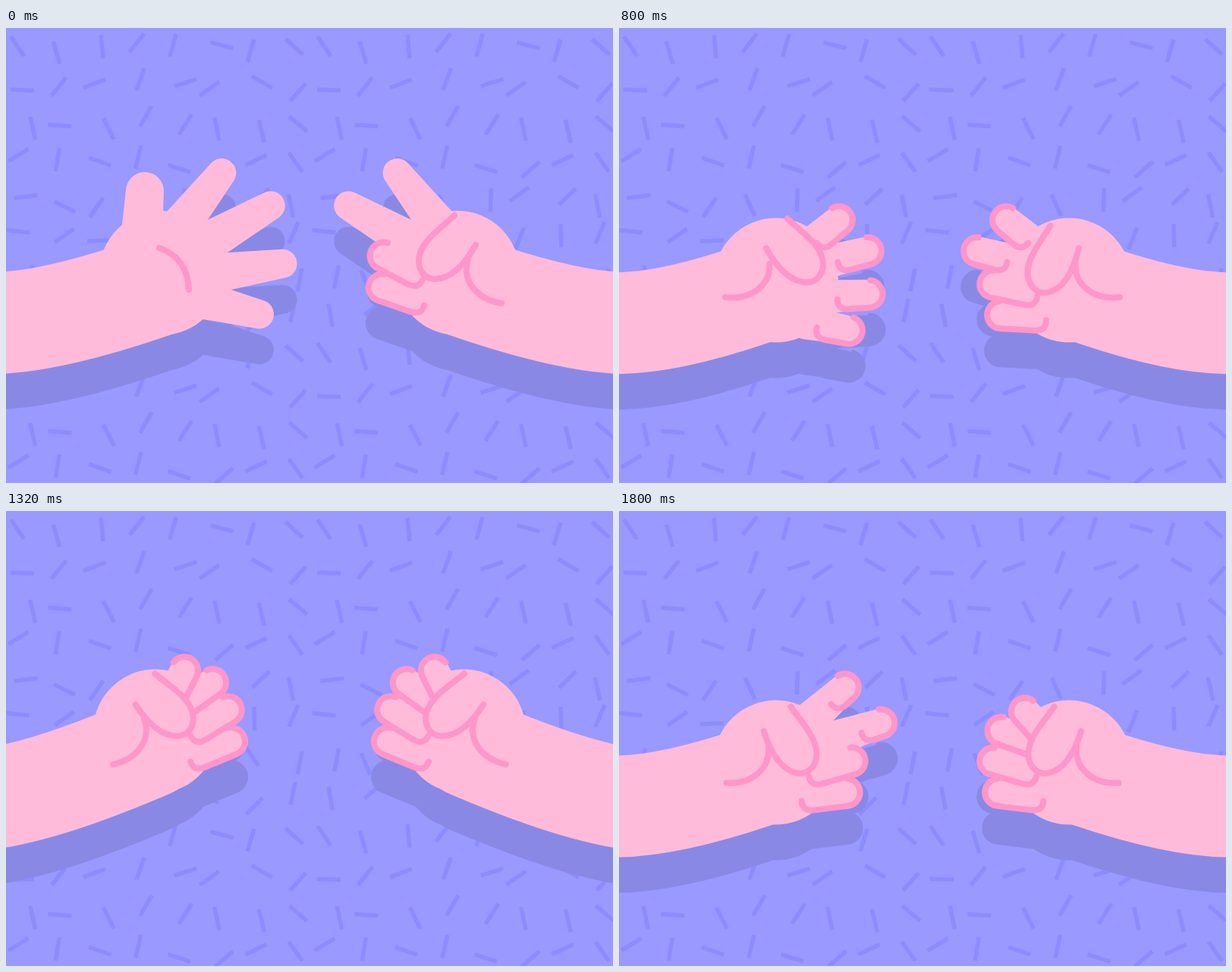
Write an HTML page with a canvas that moves like this. It is 800 px wide and 600 px high and loops after 1840 ms.

```html
<!DOCTYPE html>
<html lang="en">
<head>
<meta charset="utf-8">
<title>Rock, paper, scissors</title>
<style>
html, body { margin: 0; width: 100%; height: 100%; overflow: hidden; background: #9999ff; }
canvas { display: block; }
</style>
</head>
<body>
<canvas id="stage" width="800" height="600"></canvas>
<script>
const ctx = document.getElementById('stage').getContext('2d');
const LOOP = 1840, STEP = 40, DROP = 47, PALM = 82, TIP = 18;
const SKIN = '#ffbbd9', LINE = '#ff96ca', SHADE = '#8989e5';
const rad = deg => deg * Math.PI / 180;
const mix = (a, b, u) => a + (b - a) * u;

// time, wrist bend in degrees, arm lift, openness of the fingers
const keys = [
  [0, 0, 0, 1],
  [600, 0, 0, 1],
  [800, 16, -.03, .4],
  [940, 22, -.1, 0],
  [1080, 25, -.14, 0],
  [1200, 22, 0, 0],
  [1320, -3.5, .6, 0],
  [1560, -28, 1, 0],
  [1700, -15, .65, 0],
  [1800, 12, -.05, .7],
  [1840, 0, 0, 1]
];

// Index to little finger: distance of the tip from the palm, and tilt when folded
const fingers = [
  { shut: 89, wide: 154, tilt: -60 },
  { shut: 99, wide: 169, tilt: -32 },
  { shut: 100, wide: 160, tilt: -28 },
  { shut: 101, wide: 140, tilt: -19 }
];

// Smooth interpolation that never overshoots its keys
function sample(t) {
  const last = keys.length - 1;
  const i = keys.findIndex((key, n) => n === last - 1 || keys[n + 1][0] > t);
  const a = keys[i], b = keys[i + 1], span = b[0] - a[0], u = (t - a[0]) / span;
  const slope = (j, k) => (keys[j + 1][k] - keys[j][k]) / (keys[j + 1][0] - keys[j][0]);
  const tangent = (j, k) => {
    if (j === 0 || j === last) return 0;
    const p = slope(j - 1, k), q = slope(j, k);
    return p * q > 0 ? 2 * p * q / (p + q) : 0;
  };
  return [1, 2, 3].map(k => mix(a[k], b[k], u * u * (3 - 2 * u)) +
    span * u * (1 - u) * (tangent(i, k) * (1 - u) - tangent(i + 1, k) * u));
}

// Seeded dashes on a loose grid that repeats like wallpaper
function drawConfetti() {
  const cell = 50.5, tile = cell * 8, half = 15.5;
  let seed = 11;
  const random = () => (seed = seed * 16807 % 2147483647) / 2147483647;
  ctx.fillStyle = '#9999ff';
  ctx.fillRect(0, 0, 800, 600);
  ctx.strokeStyle = '#8c8cff';
  ctx.lineWidth = 5.5;
  ctx.lineCap = 'butt';
  ctx.beginPath();
  for (let n = 0; n < 64; n++) {
    const x0 = (n % 8 + .5 + (random() - .5) * .4) * cell;
    const y0 = (Math.floor(n / 8) + .5 + (random() - .5) * .4) * cell;
    const tilt = random() * Math.PI;
    const dx = half * Math.cos(tilt), dy = half * Math.sin(tilt);
    for (let x = x0 - tile; x < 820; x += tile)
      for (let y = y0 - tile; y < 620; y += tile) {
        ctx.moveTo(x - dx, y - dy);
        ctx.lineTo(x + dx, y + dy);
      }
  }
  ctx.stroke();
}

// Outline around two circles
function capsule(x, y, r, bx, by, br) {
  const a = Math.atan2(y - by, x - bx);
  const s = Math.acos((br - r) / Math.hypot(x - bx, y - by));
  ctx.beginPath();
  ctx.arc(x, y, r, a - s, a + s);
  ctx.arc(bx, by, br, a + s, a - s + 2 * Math.PI);
  ctx.fill();
}

// The fingers fan out evenly; an opening finger stretches and straightens
function poseFinger(i, open) {
  const { shut, wide, tilt } = fingers[i];
  const fan = rad(mix(-61 + 24 * i, -59 + 27.3 * i, Math.sqrt(open)));
  const reach = mix(shut, wide, open);
  const dir = rad(mix(tilt, -52 + 22 * i, open));
  return { x: reach * Math.cos(fan), y: reach * Math.sin(fan), dir, open };
}

function fillFinger({ x, y, dir, open }) {
  const length = mix(38, 85, open);
  capsule(x, y, TIP + 1, x - length * Math.cos(dir), y - length * Math.sin(dir), mix(20, 25.5, open));
}

// Folded fingertip: round the end, back along the lower side, then a hook
function strokeFold({ x, y, dir, open }) {
  if (open > .85) return;
  const back = -45 * (1 - open);
  ctx.save();
  ctx.translate(x, y);
  ctx.rotate(dir);
  ctx.beginPath();
  ctx.arc(0, 0, TIP, rad(-80), Math.PI / 2);
  ctx.lineTo(back, TIP);
  ctx.quadraticCurveTo(back - 16, TIP, back - 15, TIP - 14);
  ctx.stroke();
  ctx.restore();
}

function drawArm(ex, ey, lift) {
  const sy = 388.5 - 21.5 * lift, cx = ex * .38;
  const cy = ey + (ex - cx) * Math.tan(rad(19 + 7 * lift));
  ctx.lineWidth = 134;
  ctx.lineCap = 'round';
  ctx.beginPath();
  ctx.moveTo(-cx, 2 * sy - cy);
  ctx.lineTo(0, sy);
  ctx.quadraticCurveTo(cx, cy, ex, ey);
  ctx.stroke();
}

// Thumb held out, with the crease of the bare palm
function drawOpenThumb(u) {
  capsule(mix(25, -22, u), mix(-40, -108, u), 25, -26, -53, 27);
  ctx.beginPath();
  ctx.moveTo(-3, -33);
  ctx.quadraticCurveTo(34, -20, 36, 22);
  ctx.stroke();
}

// Thumb laid across the fingers
function drawFoldedThumb(open) {
  ctx.save();
  ctx.translate(-24, -37);
  ctx.rotate(rad(-40 * open));
  ctx.beginPath();
  ctx.moveTo(28, -39);
  ctx.bezierCurveTo(44, -23, 75, -4, 75, 21);
  ctx.bezierCurveTo(75, 35, 66, 45, 54, 45);
  ctx.bezierCurveTo(32, 45, 14, 25, 0, 0);
  ctx.fill();
  ctx.stroke();
  ctx.restore();
  ctx.beginPath();
  ctx.moveTo(-58, 40);
  ctx.bezierCurveTo(-25, 35, -5, 9, -14, -18);
  ctx.stroke();
}

function drawHand(bend, lift, opens, thumb, skin, line) {
  const px = 205 + .09 * bend - 13 * lift;
  const py = 323 + .5 * bend - 51 * lift;
  ctx.fillStyle = ctx.strokeStyle = skin;
  drawArm(px - 12 - 1.2 * Math.max(bend, -6), py + 19 - .54 * Math.min(bend, 0), lift);
  ctx.save();
  ctx.translate(px, py);
  ctx.rotate(rad(bend));
  ctx.beginPath();
  ctx.arc(0, 0, PALM, 0, 2 * Math.PI);
  ctx.fill();
  const posed = opens.map((open, i) => poseFinger(i, open));
  posed.forEach(fillFinger);
  ctx.strokeStyle = line;
  ctx.lineWidth = 8;
  ctx.lineCap = ctx.lineJoin = 'round';
  posed.forEach(strokeFold);
  if (thumb > .6) drawOpenThumb((thumb - .6) / .4);
  else drawFoldedThumb(thumb);
  ctx.restore();
}

function draw(t) {
  const [bend, lift, open] = sample(t);
  const early = t < 1000 ? open : 0;
  const paper = [[open, open, early, early], early];
  const scissors = [[early, early, 0, 0], 0];
  drawConfetti();
  [paper, scissors].forEach((shape, mirrored) => {
    ctx.save();
    if (mirrored) ctx.transform(-1, 0, 0, 1, 800, 0);
    ctx.translate(0, DROP);
    drawHand(bend, lift, ...shape, SHADE, SHADE);
    ctx.translate(0, -DROP);
    drawHand(bend, lift, ...shape, SKIN, LINE);
    ctx.restore();
  });
}

const start = performance.now();
function tick() {
  const t = (performance.now() - start) % LOOP;
  draw(Math.floor(t / STEP) * STEP);
  requestAnimationFrame(tick);
}
tick();
</script>
</body>
</html>
```
